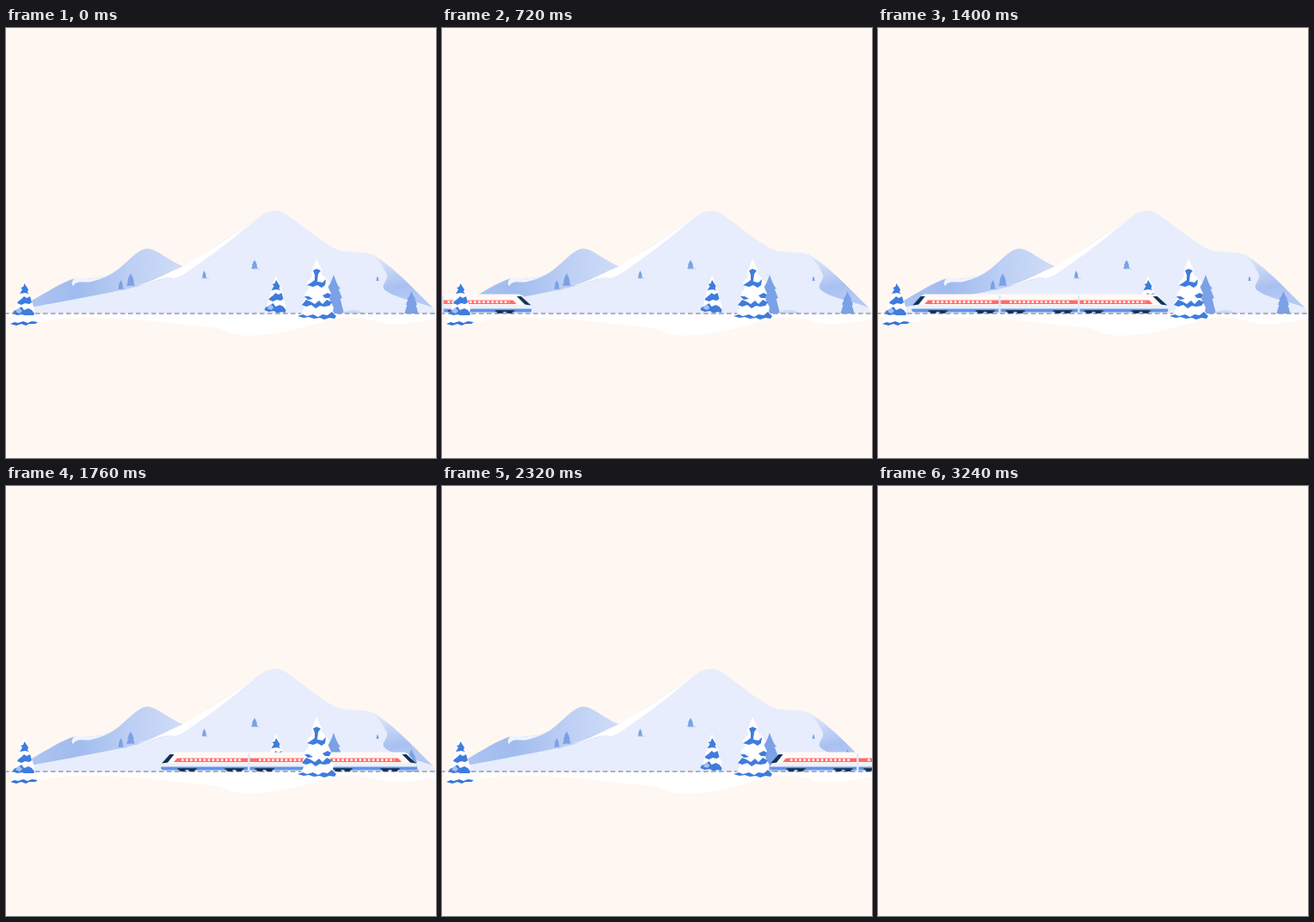
An HTML page for the animation above (3.28 s loop, 500x500 px).

```html
<!DOCTYPE html>
<html lang="en">
<head>
<meta charset="utf-8">
<title>Winter train</title>
<style>
  html, body { margin: 0; width: 100%; height: 100%; overflow: hidden; background: #fff7f1; }
  svg { display: block; width: 100%; height: 100%; }
  #scene { animation: blink 3280ms step-end infinite; }
  #train { animation: ride 3280ms linear infinite; }
  /* the bezier is an exact smoothstep over 3200 ms */
  @keyframes ride {
    0% { transform: translateX(-302px); animation-timing-function: cubic-bezier(.33333, 0, .66667, 1); }
    97.561%, 100% { transform: translateX(536px); }
  }
  @keyframes blink {
    0% { visibility: visible; }
    98.77%, 100% { visibility: hidden; }
  }
</style>
</head>
<body>
<svg viewBox="0 0 500 500">
  <defs>
    <linearGradient id="far" gradientUnits="userSpaceOnUse" x1="30" y1="0" x2="205" y2="0">
      <stop offset="0" stop-color="#adc4f1"/>
      <stop offset=".3" stop-color="#a0bbee"/>
      <stop offset=".65" stop-color="#bccff4"/>
      <stop offset="1" stop-color="#d0dcf7"/>
    </linearGradient>
    <linearGradient id="shade" gradientUnits="userSpaceOnUse" x1="440" y1="266" x2="452" y2="318">
      <stop offset="0" stop-color="#dde6fa"/>
      <stop offset=".7" stop-color="#a9c0f1"/>
      <stop offset="1" stop-color="#b4c8f3"/>
    </linearGradient>

    <!-- bare fir, 10 wide and 20 high, standing on 0,0 -->
    <path id="fir" d="M0-20C1-17 2-14 3.3-13L2.4-12.6 4.1-8 3.2-7.6 5 0H-5L-3.2-7.6-4.1-8-2.4-12.6-3.3-13C-2-14-1-17 0-20Z"/>

    <!-- blue branches with snow draped over them -->
    <g id="smallTree">
      <path fill="#fff" d="M21.500 292L26 302 28 309 30 317 33 327 32 331H10L13 319 16 309 17 302Z"/>
      <g fill="#3f7cdd">
        <path d="M21.500 297L24 301 26 304 25 307 27 309 22 308 16 309 19 304 17 302 20 301Z"/>
        <path d="M14 318L18 315 21 312 24 314 28 312 30 319 27 321 22 320 18 322 13 320Z"/>
        <path d="M9 329L14 327 18 324 21 328 26 326 30 328 33 332 32 335 28 334 23 335.500 19 333 13 334 8 332Z"/>
      </g>
      <path fill="#a8bff0" d="M11 330L15 325 19 329 16 332Z"/>
    </g>
  </defs>

  <g id="scene">
    <path fill="#fff" d="M0 332H500V338C482 343 450 346 433 342C420 337 400 336 385 338C350 346 325 357 285 357.500C258 358 260 351 240 348C205 346 180 340 130 338C95 336 65 337 50 340C40 343 30 344 10 344C7 340 10 335 0 334Z"/>

    <path fill="url(#far)" d="M28 325L30 317C46 308 64 296 80 291C95 291 112 293 126 283.500C141 274 153 256 165 256.500C177 258 188 270 206 277L180 293 130 307Z"/>
    <path fill="#f0f4fd" d="M80 290.500C76 295 76 298 78 300C83 292 91 297 99 295C112 292 120 288 130 281C116 290 103 292 94 291Z"/>
    <path fill="#e7edfc" d="M0 332L30 325C70 317 138 305 160 299C185 292 200 285 216 272C245 252 270 236 298 217.500Q313 207.500 327 217.500C350 234 365 247 383 257C395 262 412 259 425 263C446 274 467 296 496 325L500 332Z"/>
    <path fill="#fff" d="M148 300C168 297 178 289 206 277C230 263 255 247 294 220C270 240 244 261 226 273C213 282 203 290 195 291C186 286 174 297 148 300Z"/>
    <path fill="url(#shade)" d="M425 263C446 274 467 296 496 325C483 319 450 314 440 304C435 298 447 292 442 285C438 277 434 270 425 263Z"/>

    <g fill="#7ba1e6">
      <use href="#fir" transform="translate(133.500 304) scale(.65 .55)"/>
      <use href="#fir" transform="translate(145 300) scale(.95 .75)"/>
      <use href="#fir" transform="translate(230.500 291) scale(.55 .45)"/>
      <use href="#fir" transform="translate(289 280) scale(.75 .53)"/>
      <use href="#fir" transform="translate(432 294) scale(.32 .27)"/>
      <use href="#fir" transform="translate(471.500 332) scale(1.600 1.300)"/>
      <use href="#fir" transform="translate(381 332) scale(2.400 2.250)"/>
    </g>
    <path fill="none" stroke="#b7caf3" stroke-width=".8" d="M130 304H140M142 300H154M228 291H236M286 280H295"/>
    <path fill="#cbd9f7" d="M390 332C396 327 410 327 413 330L416 332Z"/>

    <use href="#smallTree" transform="translate(292.500 -4)"/>

    <path stroke="#a3959f" stroke-width="1.700" stroke-dasharray="5.500 3.500" d="M-2 332H500"/>

    <g id="train">
      <path fill="#fffaf6" d="M0 328C1 323 9 315 12 311Q13 309.500 16 309.500H282Q285 309.500 287 311L296 322Q299 327 297.500 331H1Z"/>
      <path fill="#edf0f8" d="M3 322H295L298 327H0Z"/>
      <path fill="#5e95ea" d="M0 326.500H298V328.500Q298 330.500 296 330.500H3Q0 330.500 0 326.500Z"/>
      <path fill="#ff6b69" d="M15 321L19 316.500H276L280 321Z"/>
      <path stroke="#fff" stroke-width="2.800" stroke-dasharray="2.500 2.600" d="M24 318.700H94M114 318.700H184M200 318.700H272"/>
      <path fill="#dfe8fa" d="M101 311H103.500V331H101ZM193 311H195.500V331H193Z"/>
      <path fill="#0f3054" d="M1 322.500L10.500 312H15.500L8 321.500ZM297 322.500L285.500 312H280.500L290 321.500Z"/>
      <g stroke="#10294a" fill="none">
        <path stroke-width="1.600" stroke-linecap="round" d="M20 329H41M75 329H96M110 329H131M165 329H186M201 329H222M256 329H277"/>
        <path stroke-width="2.400" stroke-dasharray="7 4" d="M21.500 330.500H39.500M76.500 330.500H94.500M111.500 330.500H129.500M166.500 330.500H184.500M202.500 330.500H220.500M257.500 330.500H275.500"/>
      </g>
    </g>

    <use href="#smallTree"/>
    <path fill="#fff" d="M9 334L33 334 37 341 34 344H8L6 341Z"/>
    <path fill="#3474da" d="M5 344L10 342 14 343 20 341 25 343 30 341 37 342 34 344 27 344 23 346 18 344 12 346Z"/>

    <path fill="#fff" d="M361 268L365 277 368 282 366 285 372 291 376 296 374 300 378 309 376 315 381 325 380 329 383 334 378 337H345L342 334 347 325 344 321 350 312 347 309 353 302 349 297 356 289 355 284Z"/>
    <g fill="#3f7cdd">
      <path d="M357 282L361 280 366 282 363 286 362 294 359 296 359 287Z"/>
      <path d="M350 299L355 296 359 293 363 295 368 296 372 292 371 299 367 302 362 299 357 301Z"/>
      <path d="M368 311L374 308 378 310 376 314 371 314ZM347 312L352 312 357 315 351 316Z"/>
      <path d="M344 322L349 316 354 318 359 321 364 317 368 321 373 316 379 319 376 323 370 324 365 323 360 326 355 322 349 324Z"/>
      <path d="M339 335L345 333 350 335 357 333 363 336 368 333 374 334 379 330 384 335 382 338 376 337 370 339 365 337 358 338 352 336 346 337Z"/>
    </g>
  </g>
</svg>
</body>
</html>
```
